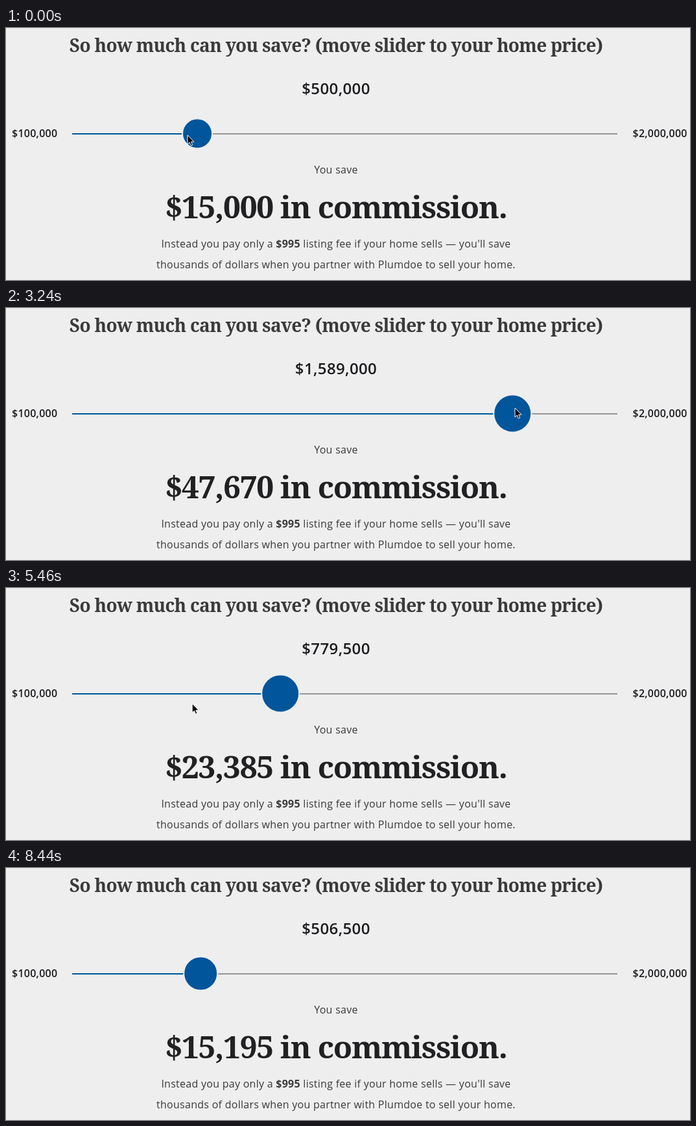
These frames come from a looping animation (1055x388 px, 8.48 s). An HTML page:

```html
<!DOCTYPE html>
<html lang="en">
<head>
<meta charset="utf-8">
<title>Savings slider</title>
<style>
  html, body { margin: 0; width: 100%; height: 100%; overflow: hidden; background: #eee; }
  svg { display: block; width: 100%; height: 100%; }
  text { font-family: "Open Sans", sans-serif; font-size: 16px; letter-spacing: .0166em; fill: #3a3a3c; }
  .middle { text-anchor: middle; }
  .slab { font-family: "Noto Serif", serif; font-weight: 700; letter-spacing: -.026em; }
  .title { font-size: 28px; }
  .saving { font-size: 48px; fill: #212123; }
  .price { font-size: 24px; font-weight: 600; fill: #1c1c20; }
  .limit { font-weight: 600; fill: #1c1c20; }
  .bold { font-weight: 700; }
</style>
</head>
<body>
<svg viewBox="0 0 1055 388">
  <text class="middle slab title" x="509" y="37">So how much can you save? (move slider to your home price)</text>
  <text class="middle price" id="price" x="509" y="102"></text>
  <text class="limit" x="9" y="168">$100,000</text>
  <text class="limit" x="966.5" y="168">$2,000,000</text>
  <rect x="102" y="162" width="841" height="2" fill="#969696"/>
  <rect id="fill" x="102" y="162" height="2" fill="#00559b"/>
  <circle id="handle" cy="162.5" fill="#00559b" stroke="#eee" stroke-width="2"/>
  <text class="middle" x="509" y="224">You save</text>
  <text class="middle slab saving" id="saving" x="509" y="293"></text>
  <text class="middle" x="509" y="338">Instead you pay only a <tspan class="bold">$995</tspan> listing fee if your home sells — you'll save</text>
  <text class="middle" x="509" y="370">thousands of dollars when you partner with Plumdoe to sell your home.</text>
  <path id="cursor" d="M0 0V14L3.2 11L5.3 16L7.7 15L5.6 10.2H10Z" fill="#000" stroke="#fff"/>
</svg>
<script>
const LOOP = 8480, STEP = 148, LEAD = 30;

const el = id => document.getElementById(id);
const clamp = (n, low, high) => Math.min(high, Math.max(low, n));
const dollars = n => "$" + Math.round(n).toLocaleString("en-US");

// Fraction of a sine-eased move between two steps
const ease = (step, from, to) => (1 - Math.cos(Math.PI * clamp((step - from) / (to - from), 0, 1))) / 2;

// The price follows the drags: nudge, far left, right, far right, back, settle
function priceAt(step) {
  return 500000
    - 16000 * ease(step, 2, 5)
    - 384000 * ease(step, 6, 12)
    + 1489000 * ease(step, 14, 22)
    + 393000 * ease(step, 22, 26)
    - 1457500 * ease(step, 30, 39.65)
    - 18000 * ease(step, 42, 45);
}

// The pointer runs ahead of the handle, then leaves through the bottom
function cursorAt(step) {
  const nudge = ease(step, 2, 5), left = ease(step, 6, 12), right = ease(step, 14, 21.26),
    end = ease(step, 22, 26), back = ease(step, 30, 37.07), settle = ease(step, 42, 45),
    leave = ease(step, 46, 50);
  return {
    x: 280 - 34 * nudge - 172 * left + 711 * right + 174 * end - 672 * back - 7 * settle + 23 * leave,
    y: 165 + 9 * left - 20 * right + 2 * end + 22 * back + 212 * leave
  };
}

function draw(time) {
  const step = Math.floor((time % LOOP + LEAD) / STEP);
  const price = Math.round(priceAt(step) / 500) * 500;
  const radius = 23 + 3 * clamp(step - 2, 0, 2) - 3 * clamp(step - 56, 0, 1);
  const x = 78.4 + price * 0.0004423 - (29 - radius) * 0.75;
  const cursor = cursorAt(step);

  el("price").textContent = dollars(price);
  el("saving").textContent = dollars(price * 0.03) + " in commission.";
  el("fill").setAttribute("width", x - 102);
  el("handle").setAttribute("cx", x);
  el("handle").setAttribute("r", radius);
  el("cursor").setAttribute("transform", `translate(${cursor.x} ${cursor.y})`);
}

const start = performance.now();
function tick() {
  draw(performance.now() - start);
  requestAnimationFrame(tick);
}
tick();
</script>
</body>
</html>
```
